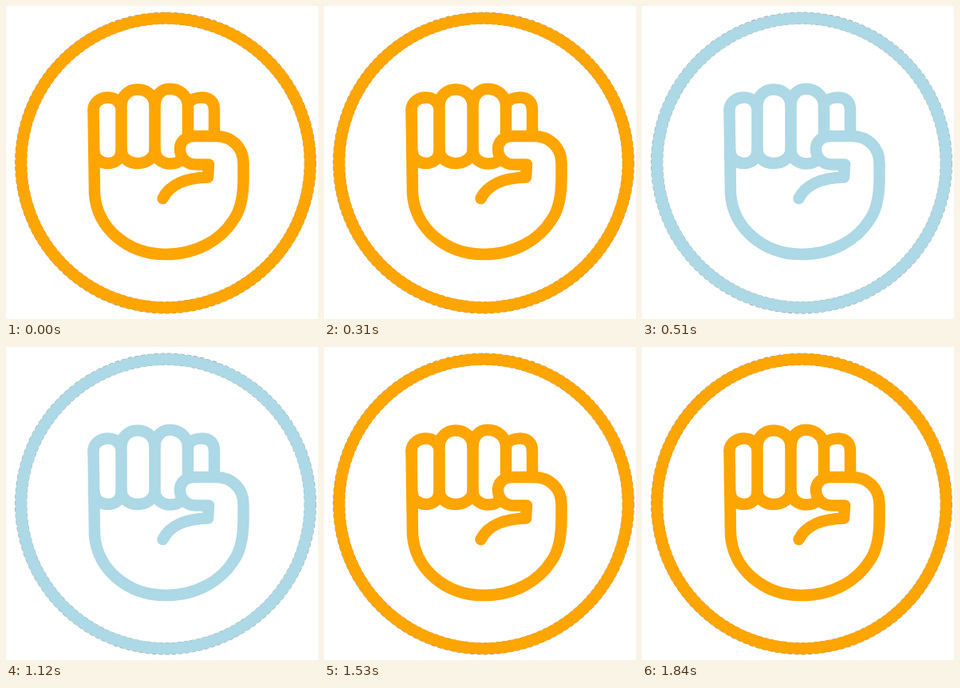
These frames come from a looping animation (391x392 px, 2040 ms). An HTML page:

```html
<!DOCTYPE html>
<html lang="en">
<head>
<meta charset="utf-8">
<title>Raised fist</title>
<style>
  html, body { margin: 0; width: 100%; height: 100%; overflow: hidden; background: #fff; }
  svg { display: block; width: 100%; height: 100%; }
</style>
</head>
<body>
<svg viewBox="0 0 391 392" fill="none" stroke-width="14.5" stroke-linecap="round" stroke-linejoin="round">
  <circle cx="200" cy="196.5" r="181.3" stroke="#665" stroke-width="15.3" stroke-linecap="butt" stroke-dasharray="5 3" opacity=".6"/>
  <g id="icon" stroke="#ffa500">
    <circle cx="200" cy="196.5" r="181.3"/>
    <!-- fingers -->
    <path d="M109.5 130C109.5 120 119 114.5 128 114.5S144.5 121 144.5 130V181C144.5 191 137 197 128 197S111 191 111 184"/>
    <path d="M144.5 125C144.5 112 154 104.5 165 104.5S186.5 112 186.5 125V180C186.5 190 176 197 165 197S144.5 190 144.5 180"/>
    <path d="M186.5 125C186.5 112 195 103.8 205 103.8C217 103.8 228 112 228 125V163M186.5 180C186.5 191 196 197.5 206 197.5Q215 197.5 221 192"/>
    <path d="M228 123C231 117 239 114.5 246 114.5C255 114.5 261 120 261 130V163"/>
    <!-- palm and thumb -->
    <path d="M109.5 130L111 235C114 278 152 311 200 311C240 311 270 292 285 268C294 256 297.5 238 297.5 215V197C297.5 177 283 163 263 163H236C225 163 218 170 218 179C218 190 226 198.5 238 198.5H254L253 214.5C225 215 205 224 196.5 241"/>
  </g>
</svg>
<script>
  const icon = document.getElementById('icon');
  const start = performance.now();

  function draw(now) {
    const t = Math.max(0, now - start) % 2040;
    icon.setAttribute('stroke', t >= 510 && t < 1530 ? '#add8e6' : '#ffa500');
    requestAnimationFrame(draw);
  }
  requestAnimationFrame(draw);
</script>
</body>
</html>
```
